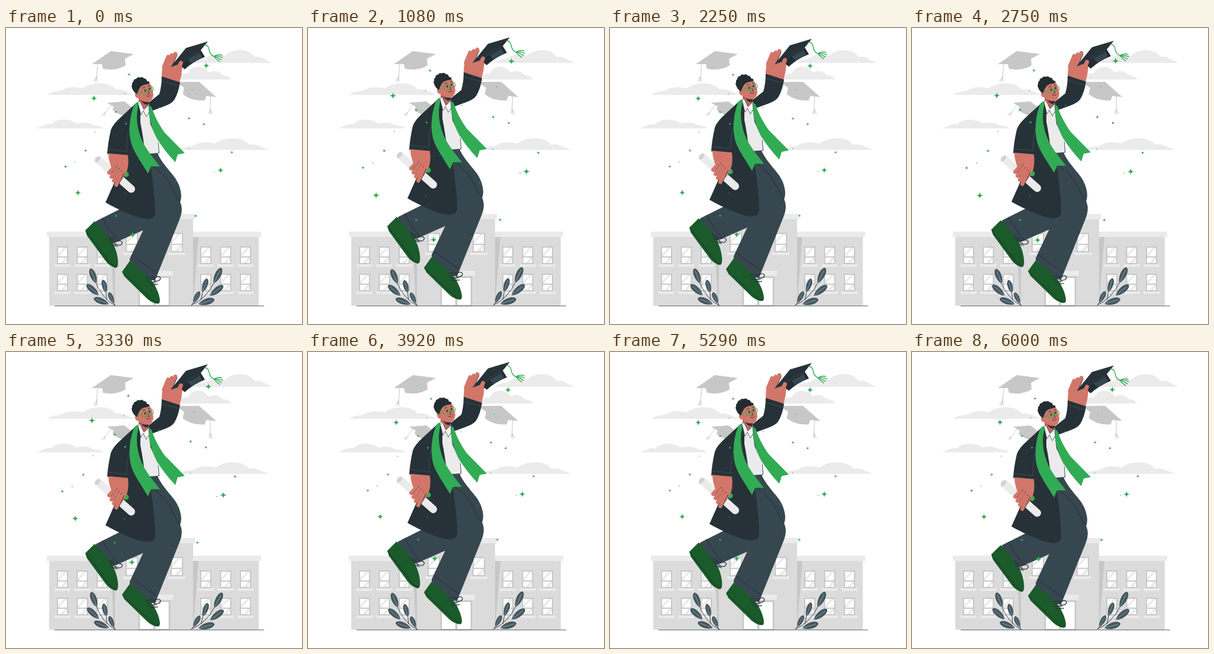
Write an HTML page that moves like this. It is 500 px wide and 500 px high and loops after 6.04 s.

```html
<!DOCTYPE html>
<html lang="en">
<head>
<meta charset="utf-8">
<title>Graduation jump</title>
<style>
html, body { margin: 0; width: 100%; height: 100%; overflow: hidden; background: #fff; }
svg { display: block; width: 100%; height: 100%; }
.line { fill: none; stroke-linecap: round; stroke-linejoin: round; }
.ink { stroke: #1d272c; stroke-width: .8; }
.seam { stroke: #4a5960; stroke-width: .6; }
.skin { stroke: #d3766a; stroke-width: 7; }
</style>
</head>
<body>
<svg viewBox="0 0 500 500">
  <defs>
    <path id="cloud" d="M0 0C.05-.4 .12-.2 .18-.45C.24-.75 .34-.65 .4-.55C.46-1 .68-1.3 .77-.45C.85-.6 .93-.1 1 0Z"/>
    <g id="cap">
      <path d="M0 22L32 0L71 5L56 13L57 24Q42 34 19 30L17 22Z"/>
      <path class="line" stroke="#c7c7c7" d="M10 21L8 43L3 51M8 43L6 52M8 43L9 51"/>
    </g>
    <g id="shoe">
      <path fill="#1b5a2b" d="M0 0L13-18Q38 1 51 16C58 26 63 38 64 48Q64 54 60 54Q51 53 43 46L4 8Z"/>
      <path class="line" stroke="#123d1d" d="M1 1L47 44Q55 52 63 52"/>
      <path class="line" stroke="#263238" stroke-width="1.200" d="M53 11Q62 5 65 10Q65 17 54 15"/>
    </g>
    <g id="sprig"></g>
  </defs>

  <g fill="#ebebeb">
    <use href="#cloud" transform="translate(316 59) scale(135 22)"/>
    <use href="#cloud" transform="translate(380 87) scale(-95 22)"/>
    <use href="#cloud" transform="translate(70 113) scale(150 20)"/>
    <use href="#cloud" transform="translate(165 169.500) scale(-115 15)"/>
    <use href="#cloud" transform="translate(293 206) scale(153 20)"/>
  </g>
  <g fill="#c7c7c7">
    <use href="#cap" transform="translate(145 39)"/>
    <use href="#cap" transform="translate(358 95) rotate(7) scale(-1 1)"/>
    <use href="#cap" transform="translate(179 112) rotate(30) scale(.75)"/>
  </g>

  <g id="school">
    <path fill="#dbdbdb" d="M73 353H184V321H316V353H427V469H73Z"/>
    <path fill="#c7c7c7" d="M177 353H184V469H182ZM316 353H325L316 469Z"/>
    <path fill="#ebebeb" d="M69 344H184V353H69ZM316 344H431V353H316ZM180 314H319V323H180ZM218 410H282V418.500H218Z"/>
    <path fill="#fff" stroke="#c7c7c7" stroke-width="2.500" d="M225 421H250V469H225ZM251 421H276V469H251Z"/>
  </g>
  <path stroke="#455a64" stroke-width=".9" d="M82 469.500H436"/>
  <use id="left" href="#sprig"/>
  <use id="right" href="#sprig"/>

  <g id="man">
    <!-- legs -->
    <path fill="#37474f" d="M153 326L195 305L250 300L245 336L186 362L178 364L150 330Z"/>
    <path class="line ink" d="M163 321Q175 343 189 359"/>
    <use href="#shoe" transform="translate(134 342) rotate(9.500)"/>
    <path fill="#37474f" d="M240 212H256C266 234 285 248 291 263C297 277 297 288 294 294C298 302 298 312 293 324L252 426L245 426L209 394V390L241 322Z"/>
    <path class="line ink" d="M213 384Q232 399 254 414M248 234Q268 246 280 270T294 294"/>
    <use href="#shoe" transform="translate(196 412)"/>
    <g id="laces" class="line" stroke="#263238" stroke-width="1.200"></g>

    <!-- raised arm -->
    <path fill="#d3766a" d="M263 84Q263 66 267 59L290 58L298 66Q297 80 293 93Z"/>
    <g id="fingers" class="line"></g>
    <path fill="#263238" d="M263 82L294 92Q291 111 284 122Q280 128 266 133L247 140L240 127L259 112Q263 98 263 82Z"/>
    <path class="line seam" d="M263 90L293 98"/>

    <!-- gown and shirt -->
    <path fill="#263238" d="M222 127L213 150L205 200L188 250L168 295C190 307 222 323 240 323Q251 322 252 314C252 285 248 260 244 232V212H259L258 195L244 150L240 126Z"/>
    <path fill="#263238" d="M221 126L196 149Q180 163 177 173Q172 195 171 213L206 215.500L216 180Z"/>
    <path class="line seam" d="M172 205L205 209M213 160Q204 176 204 208"/>
    <path fill="#ebebeb" d="M227 134L241 138L244 163L257 191L258 211Q250 213 235 213Q232 185 227 160Z"/>
    <path fill="#37474f" d="M242 212.500L256 211.500L258 220L248 234Z"/>

    <!-- scarf -->
    <g fill="#32ab55">
      <path d="M222 125L217 129C209 148 207 170 210 188C213 205 222 217 240 246L245 234L260 234C242 211 231 198 225 177C220 158 220 146 224 129Z"/>
      <path d="M240 129C241 150 245 168 255 187Q267 207 286 227L290 214L302 211.500L268 177C256 160 250 146 246 134Z"/>
    </g>

    <!-- head -->
    <path fill="#c4655a" d="M224 114L240 122L241 132L233 138L224 128Z"/>
    <path fill="#f5f5f5" stroke="#263238" stroke-width=".7" d="M223 127L226 123L233 138L241 130L242 142L237 150L232 140L228 147Z"/>
    <path fill="#263238" d="M227 119Q236 125 243 122L239 130Q231 130 227 119Z"/>
    <path fill="#d3766a" d="M222 104Q227 92 242 92C246 98 248 105 249 113Q248 123 240 125Q230 126 225 119Q219 119 218 114Q217 109 222 110Z"/>
    <g id="hair" fill="#222d32">
      <path d="M212 98Q224 83 242 91Q243 95 239 95Q228 96 225 103L221 112Q214 108 212 98Z"/>
    </g>
    <g class="line" stroke="#32ab55" stroke-width="1.100">
      <circle cx="234" cy="107" r="4.800"/><circle cx="244.500" cy="103.500" r="4.500"/>
      <path d="M229 108L221 112M238.500 105L240.500 104.500"/>
    </g>
    <g fill="#222d32">
      <ellipse cx="235" cy="106" rx="1.200" ry="2"/><ellipse cx="242.500" cy="103" rx="1.200" ry="2"/>
    </g>
    <path class="line ink" d="M231 101L235 100M240 98L243 97.500M240 107L242 111L239 112M237 115Q241 117 244 114"/>

    <!-- mortarboard -->
    <path fill="#222d32" d="M292 58L328 36L336 49Q316 57 302 70Q297 67 292 58Z"/>
    <path fill="#37474f" d="M307 53L327 42L331 50L313 60Z"/>
    <path fill="#263238" d="M278 66L304 34L341 23L327 40Q306 49 296 60Z"/>
    <path class="line seam" d="M279 66Q291 62 298 58Q309 47 327 40"/>
    <path class="line" stroke="#32ab55" stroke-width="1.400" d="M335 29Q341 28 343 36Q344 45 351 48Q358 44 365 46M351 48Q359 47 366 50M351 48Q358 50 364 54M351 48Q355 53 361 57"/>
    <path class="line skin" d="M289 82Q291 68 295.500 59"/>

    <!-- diploma and hand -->
    <path class="line" stroke="#ebebeb" stroke-width="13" d="M156.500 223L211.500 272"/>
    <ellipse rx="3.500" ry="6" fill="#d2d2d2" transform="translate(154.500 222) rotate(42)"/>
    <circle cx="203" cy="247.500" r="4.500" fill="#32ab55"/>
    <path fill="#d3766a" d="M173 212L206 215Q208 232 204 243L195 258L180 240Q173 226 173 212Z"/>
    <g id="grip" class="line"></g>
  </g>
  <g id="sparks" fill="#32ab55"></g>
</svg>
<script>
const $ = id => document.getElementById(id);
const add = (id, markup) => $(id).insertAdjacentHTML('beforeend', markup);
const repeat = (n, make) => { for (let i = 0; i < n; i++) make(i); };

function pane(x, y, w, h) {
  add('school', `<rect x="${x}" y="${y}" width="${w}" height="${h}" fill="#fff"/>
    <path fill="#ebebeb" d="M${x} ${y + 13}l12-13h5l-17 18ZM${x + 4} ${y + h}l${w - 4}-15v6l-7 9Z"/>
    <path fill="none" stroke="#c7c7c7" stroke-width="2" d="M${x} ${y}h${w}v${h}h${-w}Zm0 ${h * .6}h${w}"/>
    <rect x="${x - 5}" y="${y + h + 1}" width="${w + 10}" height="4.500" fill="#ebebeb"/>`);
}
repeat(12, i => pane((i < 6 ? 87 : 329) + i % 3 * 33.500, i % 6 < 3 ? 370 : 416, 17, 28));
repeat(2, i => pane(203 + 76 * i, 347, 19, 31));

const leaf = (x, y, angle, len) => add('sprig', `<g transform="translate(${x} ${y}) rotate(${angle}) scale(${len / 26})">
  <path fill="#455a64" stroke="#263238" stroke-width=".7" d="M0 0C8-6 24-6 26 0C24 6 8 6 0 0"/>
  <path class="line" stroke="#c9d1d5" stroke-width=".5" d="M0 0H22"/></g>`);
add('sprig', '<path class="line ink" d="M0 0Q-22-11-33-38M-3-4L-1-1M-16-22L-15-10"/>');
leaf(-33, -38, 249, 26);
repeat(2, k => {
  leaf(-12 - 17 * k, -3 - 15 * k, 201 + 21 * k, 26);
  leaf(-3 - 13 * k, -4 - 18 * k, 246 + 10 * k, 20 + 2 * k);
});

repeat(4, i => add('laces', `<path d="M${172 + 2 * i} ${353 + 4 * i}l10 4M${236 + 2.500 * i} ${422 + 4 * i}l13 -1"/>`));
repeat(6, i => {
  const a = 2.900 + i / 2;
  add('hair', `<circle cx="${227 + 10 * Math.cos(a)}" cy="${97.500 + 10 * Math.sin(a)}" r="4.500"/>`);
});
const finger = (id, x, y, u, v) => add(id, `<path class="skin" d="M${x} ${y}L${u} ${v}"/>
  <path class="ink" d="M${x + 3.500} ${y - 1}L${u + 3} ${v + 2}"/>`);
repeat(3, i => finger('fingers', 267 + 5 * i, 66, 274 + 6 * i, 49 - 2.500 * i));
repeat(4, i => finger('grip', 184 + 4 * i, 234 + 4 * i, 174.500 + 4 * i, 244.500 + 6.800 * i));

// Key points are offsets from the centre of the sparkles.
const star = r => ([x, y]) => add('sparks', `<path d="M${x} ${y - r}q0 ${r} ${r} ${r}q${-r} 0 ${-r} ${r}q0 ${-r} ${-r} ${-r}q${r} 0 ${r} ${-r}"/>`);
[[-93, -79], [96, -134], [120, 42], [-120, 80], [-28, 151]].forEach(star(6));
[[-34, -119], [-56, -56], [67, -45], [-107, 9], [139, 12], [-141, 36], [-56, 119], [78, 119]].forEach(star(3.300));
// Tiny dots on a golden-angle spiral
repeat(12, i => {
  const r = 60 + 7 * i, a = 2.400 * i + 4;
  add('sparks', `<circle cx="${r * Math.cos(a)}" cy="${r * Math.sin(a) * .8}" r="${i % 6 ? .8 : 1.500}"/>`);
});

// Linear interpolation over [position, value] stops
function track(stops, k) {
  const i = stops.findIndex(s => k <= s[0]) || 1;
  const [a, p] = stops[i - 1], [b, q] = stops[i];
  return p + (q - p) * (k - a) / (b - a);
}
const wave = k => 1 - Math.abs(1 - 2 * k);
const sway = [[0, 0], [.25, 1.500], [.75, -1.500], [1, 0]];
const beat = [[0, 1], [.1, 1.100], [.3, 1], [.4, 1], [.5, 1.100], [.6, 1], [1, 1]];

function draw() {
  const t = performance.now() % 6040 + 20;
  const phase = period => t % period / period;
  const move = (id, transform) => $(id).setAttribute('transform', transform);
  const angle = track(sway, phase(1500));
  move('man', `translate(0 ${-10 * wave(phase(3000))})`);
  move('left', `translate(185 469) rotate(${angle})`);
  move('right', `translate(313 468) rotate(${angle + 6}) scale(-1.03 1.08)`);
  move('sparks', `translate(242 198) scale(${track(beat, phase(6000))})`);
  requestAnimationFrame(draw);
}
draw();
</script>
</body>
</html>
```
